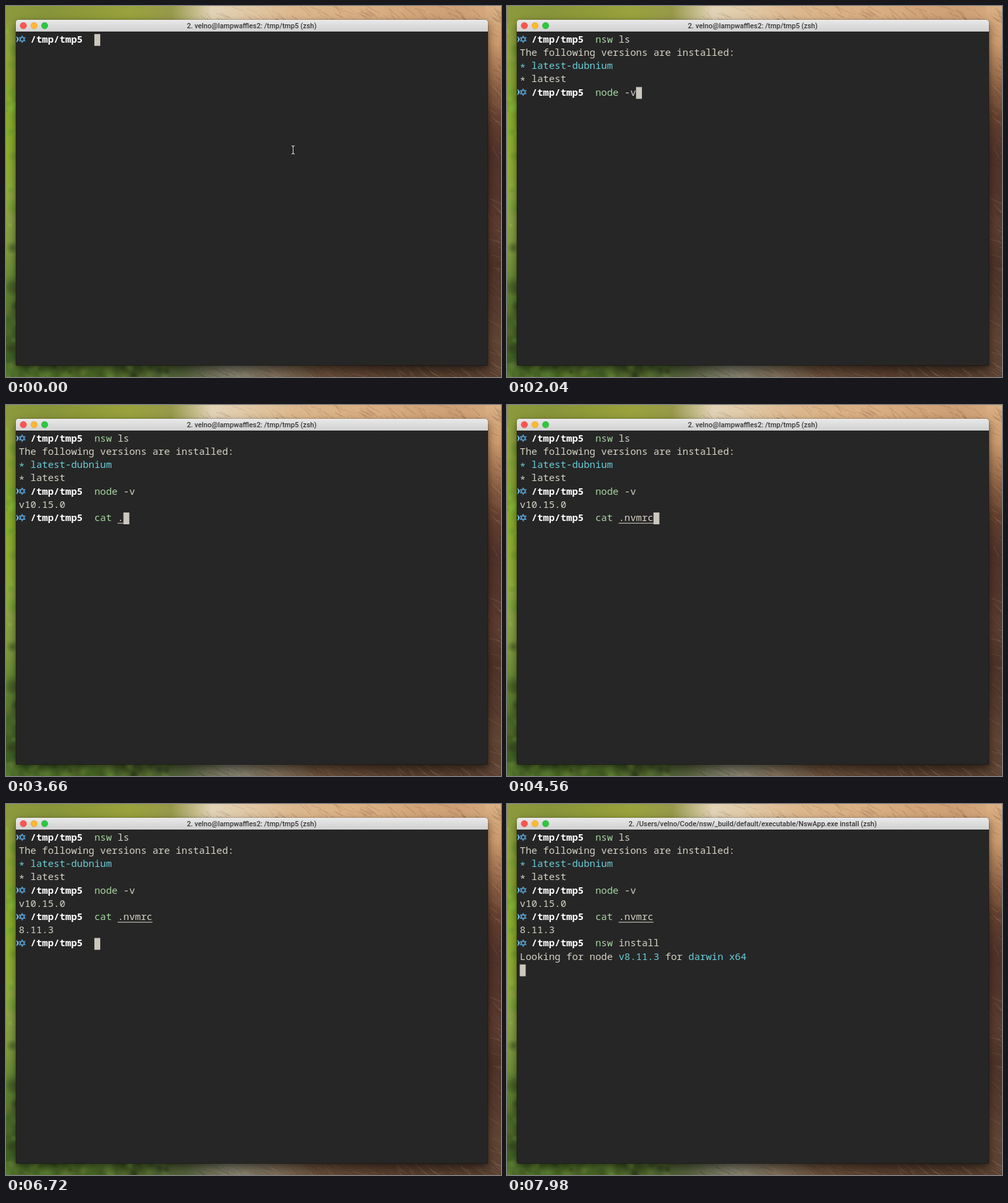
An HTML page with a canvas that plays this animation: 756 by 566 pixels, repeating every 8 s.

```html
<!DOCTYPE html>
<html lang="en">
<head>
<meta charset="utf-8">
<title>Terminal session</title>
<style>
  html, body { margin: 0; width: 100%; height: 100%; overflow: hidden; }
  canvas { display: block; }
</style>
</head>
<body>
<canvas id="stage" width="756" height="566"></canvas>
<script>
const W = 756, H = 566, LOOP = 8000;
const CELL = 8.88, LEFT = 19.5, LINE = 20.2, BASE = 55.8;
const MONO = '14.8px "Noto Sans Mono", "DejaVu Sans Mono", monospace';
const PLAIN = '#d6d3c4', GREEN = '#a5d6a0', CYAN = '#6bced8', BLUE = '#5ca7dc';

const SHELL_TITLE = '2. velno@lampwaffles2: /tmp/tmp5 (zsh)';
const INSTALL_TITLE = '2. /Users/velno/Code/nsw/_build/default/executable/NswApp.exe install (zsh)';

// Each entry: command and argument, typing start, time per key, Enter, output delay and lines.
const session = [
  { command: 'nsw', rest: ' ls', start: 300, step: 100, enter: 960, delay: 60, output: [
    [['The following versions are installed:', PLAIN]],
    [['* latest-dubnium', CYAN]],
    [['* latest', PLAIN]]] },
  { command: 'node', rest: ' -v', start: 1380, step: 100, enter: 2280, delay: 60, output: [
    [['v10.15.0', PLAIN]]] },
  { command: 'cat', rest: ' .nvmrc', path: true, start: 3120, step: 120, enter: 4860, delay: 0, output: [
    [['8.11.3', PLAIN]]] },
  { command: 'nsw', rest: ' install', start: 6780, step: 80, enter: 7740, delay: 60, busy: true, output: [
    [['Looking for node ', PLAIN], ['v8.11.3', CYAN], [' for ', PLAIN], ['darwin x64', CYAN]]] }
];

const stage = document.getElementById('stage');
const ctx = stage.getContext('2d');
const backdrop = paintBackdrop();

function seeded(seed) {
  return () => (seed = (seed * 16807) % 2147483647) / 2147483647;
}

function gradient(g, coords, colors) {
  const fill = g.createLinearGradient(...coords);
  colors.forEach((color, i) => fill.addColorStop(i / (colors.length - 1), color));
  return fill;
}

function trafficLight(g, x, color, rim) {
  g.fillStyle = color;
  g.strokeStyle = rim;
  g.lineWidth = .7;
  g.beginPath();
  g.arc(x, 30, 4.8, 0, Math.PI * 2);
  g.fill();
  g.stroke();
}

function paintBackdrop() {
  const canvas = document.createElement('canvas');
  canvas.width = W;
  canvas.height = H;
  const g = canvas.getContext('2d');
  const random = seeded(71);
  const strip = (x, y, w, h, coords, colors) => {
    g.fillStyle = gradient(g, coords, colors);
    g.fillRect(x, y, w, h);
  };

  strip(0, 0, 20, H, [0, 0, 0, H],
    ['#8d9a3c', '#93a63c', '#8aa52f', '#8cb02a', '#8fae34', '#8fa648', '#7c9a3c', '#5d8030', '#466a28', '#3a5a22']);
  strip(0, 0, W, 24, [0, 0, W, 0],
    ['#8d9a3c', '#87943a', '#8f9a38', '#99a23c', '#97984a', '#e2d3b6', '#e0c6a2', '#dcb78d', '#dab286', '#d9ae82', '#d2a478', '#cfa076', '#d6ab80']);
  strip(732, 0, 24, H, [0, 0, 0, H],
    ['#d9b084', '#cc9a6c', '#96694a', '#65402f', '#50332a', '#53352b', '#5c3d30', '#4d3328', '#563b2e', '#604433', '#5c4232']);
  strip(0, 545, W, 21, [0, 0, W, 0],
    ['#4d7028', '#42611f', '#486824', '#475f2a', '#55603c', '#84826f', '#7c6c56', '#664c37', '#5c4230', '#553c2c', '#553d2d', '#5c4232']);

  // Soft foliage, with stronger contrast near the ground
  for (let i = 0; i < 110; i++) {
    const below = i > 45;
    const x = below ? random() * 270 : random() * 16;
    const y = below ? 548 + random() * 20 : random() * H;
    const r = 4 + random() * 11;
    const ground = y > 360;
    const light = ground ? 13 + random() * 32 : 34 + random() * 18;
    const saturation = ground ? 42 : 56;
    const glow = g.createRadialGradient(x, y, 0, x, y, r);
    glow.addColorStop(0, `hsla(${74 + random() * 18},${saturation}%,${light}%,.6)`);
    glow.addColorStop(1, `hsla(86,${saturation}%,${light}%,0)`);
    g.fillStyle = glow;
    g.fillRect(x - r, y - r, 2 * r, 2 * r);
  }

  // Fine fur on the top, right and bottom edges
  for (let i = 0; i < 520; i++) {
    const edge = i % 3;
    const x = edge === 1 ? 736 + random() * 22 : 290 + random() * 466;
    const y = edge === 0 ? random() * 22 : edge === 1 ? random() * H : 548 + random() * 20;
    const dark = random() < .6;
    g.strokeStyle = dark ? 'rgba(65,34,20,.13)' : 'rgba(255,226,184,.1)';
    g.lineWidth = .6 + random();
    g.beginPath();
    g.moveTo(x, y);
    g.lineTo(x + 8 + random() * 12, y + 4 + random() * 12);
    g.stroke();
  }

  g.save();
  g.shadowColor = 'rgba(0,0,0,.55)';
  g.shadowBlur = 14;
  g.shadowOffsetY = 6;
  g.fillStyle = '#262626';
  g.beginPath();
  g.roundRect(15, 21, 721, 527.5, [4, 4, 2, 2]);
  g.fill();
  g.restore();
  g.strokeStyle = 'rgba(0,0,0,.3)';
  g.lineWidth = 1;
  g.stroke();

  g.fillStyle = gradient(g, [0, 21, 0, 39], ['#e9e9e9', '#d0d0d0']);
  g.beginPath();
  g.roundRect(15, 21, 721, 18, [4, 4, 0, 0]);
  g.fill();
  trafficLight(g, 26.5, '#fc5550', '#df4640');
  trafficLight(g, 42.8, '#fdb92f', '#de9f34');
  trafficLight(g, 59, '#2bc840', '#27aa35');
  return canvas;
}

function write(text, col, row, color, weight = 500) {
  ctx.font = `${weight} ${MONO}`;
  ctx.fillStyle = color;
  const x = LEFT + col * CELL, y = BASE + row * LINE;
  if (text[0] === '*') {
    // The bullet sits at mid height
    ctx.fillText('*', x, y + 3);
    ctx.fillText(text.slice(2), x + 2 * CELL, y);
  } else {
    ctx.fillText(text, x, y);
  }
}

function triangle(x, y, r, turn) {
  ctx.beginPath();
  for (let i = 0; i < 3; i++) {
    const angle = turn + i * Math.PI * 2 / 3;
    ctx.lineTo(x + r * Math.cos(angle), y + r * Math.sin(angle));
  }
  ctx.closePath();
  ctx.stroke();
}

function drawPrompt(row) {
  const y = 50.7 + row * LINE;
  ctx.fillStyle = '#78c0ea';
  ctx.beginPath();
  ctx.moveTo(15.5, y - 5);
  ctx.quadraticCurveTo(18.5, y - 3, 19.6, y);
  ctx.quadraticCurveTo(18.5, y + 3, 15.5, y + 5);
  ctx.lineTo(17, y);
  ctx.fill();
  ctx.strokeStyle = BLUE;
  ctx.lineWidth = 1.1;
  triangle(24.7, y, 5, Math.PI / 2);
  triangle(24.7, y, 5, -Math.PI / 2);
  write('/tmp/tmp5', 2, row, '#fff', 700);
}

function drawCursor(col, row) {
  ctx.fillStyle = '#cbc7bd';
  ctx.fillRect(LEFT + col * CELL, 42.8 + row * LINE, 9, 18);
}

function drawPointer() {
  const x = 438.5, y = 219.5;
  for (const [color, width] of [['#111', 2.6], ['#ddd', 1.1]]) {
    ctx.strokeStyle = color;
    ctx.lineWidth = width;
    ctx.beginPath();
    for (const end of [-1, 1]) {
      ctx.moveTo(x - 2.5, y + end * 6.5);
      ctx.quadraticCurveTo(x, y + end * 6.5, x, y + end * 4);
      ctx.quadraticCurveTo(x, y + end * 6.5, x + 2.5, y + end * 6.5);
    }
    ctx.moveTo(x, y - 5);
    ctx.lineTo(x, y + 5);
    ctx.stroke();
  }
}

function drawSession(t) {
  let row = 0;
  for (const { command, rest, path, start, step, enter, delay, busy, output } of session) {
    drawPrompt(row);
    const count = Math.max(0, Math.min(command.length + rest.length, Math.floor((t - start) / step) + 1));
    const argument = rest.slice(0, Math.max(0, count - command.length));
    write(command.slice(0, count), 13, row, GREEN);
    write(argument, 13 + command.length, row, PLAIN);
    if (path && argument.length > 1) {
      ctx.fillStyle = PLAIN;
      ctx.fillRect(LEFT + (14 + command.length) * CELL, BASE + row * LINE + 2.8,
        (argument.length - 1) * CELL, 1);
    }
    if (t < enter) return drawCursor(13 + count, row);
    row++;
    if (t < enter + delay) return drawCursor(0, row);
    for (const line of output) {
      let col = 0;
      for (const [text, color] of line) {
        write(text, col, row, color);
        col += text.length;
      }
      row++;
    }
    if (busy) return drawCursor(0, row);
  }
}

function draw(now) {
  const t = now % LOOP;
  ctx.drawImage(backdrop, 0, 0);
  ctx.font = '500 10.8px Roboto, Inter, sans-serif';
  ctx.fillStyle = '#363636';
  ctx.textAlign = 'center';
  ctx.fillText(t < 7740 ? SHELL_TITLE : INSTALL_TITLE, 375.3, 34);
  ctx.textAlign = 'left';
  drawSession(t);
  if (t < session[0].start) drawPointer();
}

const began = performance.now();
function tick() {
  draw(performance.now() - began);
  requestAnimationFrame(tick);
}
tick();
</script>
</body>
</html>
```
